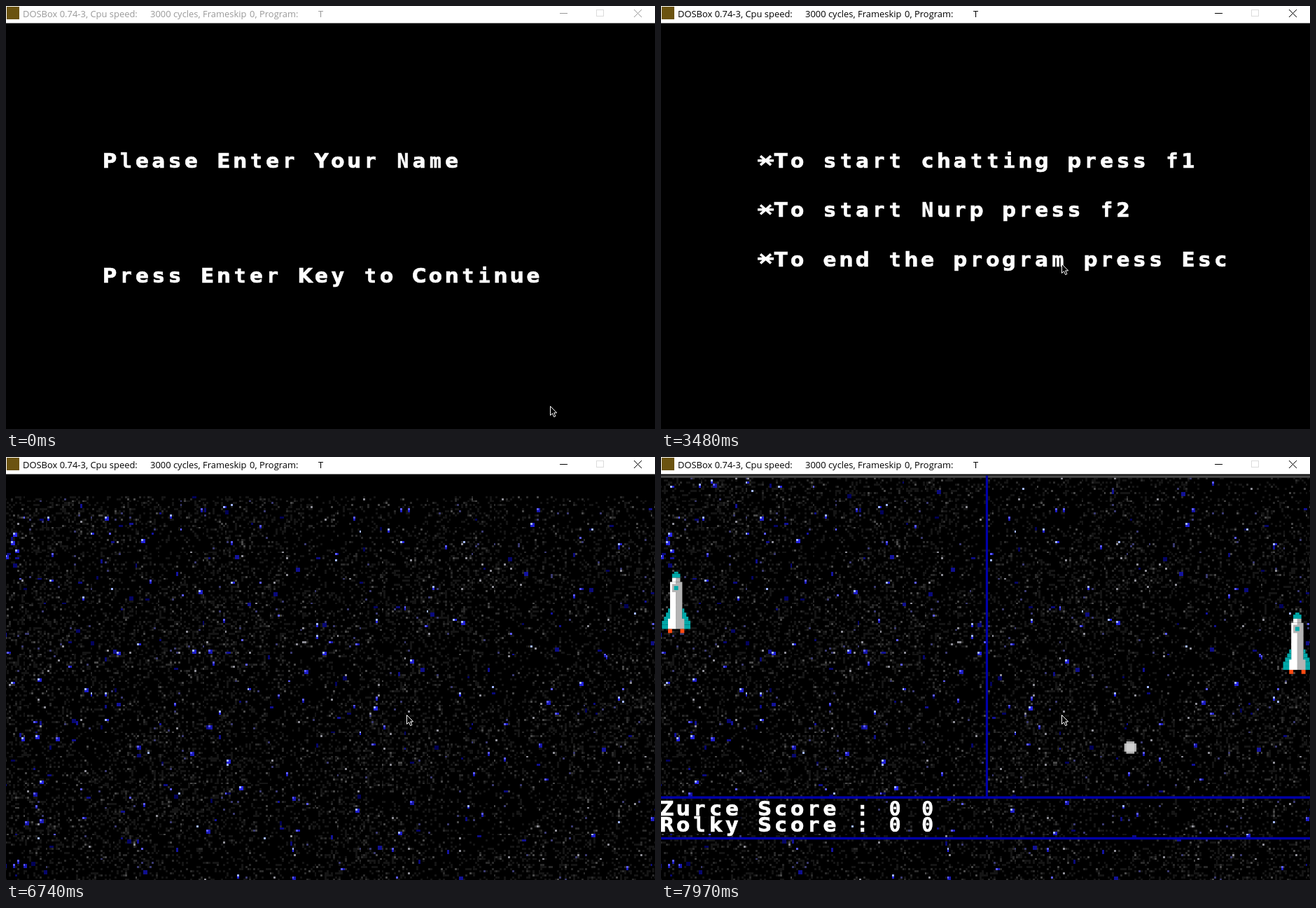
An HTML page with a canvas that plays this animation: 927x604 px, repeating every 8 s.

```html
<!DOCTYPE html>
<html lang="en">
<head>
<meta charset="utf-8">
<title>Terminal game</title>
<style>
  html, body { margin: 0; width: 100%; height: 100%; overflow: hidden; background: #000; }
  canvas { display: block; width: 100%; height: 100%; }
</style>
</head>
<body>
<canvas id="stage" width="927" height="604"></canvas>
<script>
const LOOP = 8000;
const FOCUS = 380, MENU = 3480, LEVELS = 5500, GAME = 6590;
const FRAME = 76.7;
const ctx = document.getElementById('stage').getContext('2d');

// The 320 x 200 screen inside the window
const view = { x: -1.6, y: 23.6, sx: 2.909, sy: 2.92 };
const CELL_W = 8 * view.sx, CELL_H = 8 * view.sy;
const WIDE = 'bold 28px "DejaVu Sans", sans-serif';
const MONO = 'bold 28px "DejaVu Sans Mono", monospace';

// When each player's line opens and its letters are typed
const players = [
  { name: 'Zurce', opens: 0, keys: [680, 930, 1000, 1230, 1460] },
  { name: 'Rolky', opens: 1690, keys: [2090, 2240, 2550, 2870, 3330] }
];

function seeded(seed) {
  return () => (seed = (Math.imul(seed, 1664525) + 1013904223) >>> 0) / 4294967296;
}

function makeSky() {
  const canvas = document.createElement('canvas');
  canvas.width = 320;
  canvas.height = 200;
  const g = canvas.getContext('2d');
  const random = seeded(74);
  const dot = (color, x, y, w = 1, h = 1) => {
    g.fillStyle = color;
    g.fillRect(x, y, w, h);
  };
  dot('#000', 0, 0, 320, 200);
  for (let y = 2; y < 200; y++) {
    for (let x = 0; x < 320; x++) {
      const patchiness = Math.sin(x / 27 + y / 19) * Math.cos(y / 31 - x / 43);
      const level = random() / (1 + 0.35 * patchiness - x / 1600);
      if (level < 0.002) dot('#8c8c94', x, y);
      else if (level < 0.006) dot('#39396e', x, y);
      else if (level < 0.016) dot('#484848', x, y);
      else if (level < 0.055) dot('#2a2a2a', x, y);
      else if (level < 0.24) dot('#151515', x, y);
    }
  }
  // Blue stars, denser on the left, some with a pale core
  for (let i = 0; i < 330; i++) {
    const x = Math.floor(320 * random() ** 1.25), y = 3 + Math.floor(196 * random());
    const glow = random();
    const w = random() < 0.5 ? 2 : 1, h = random() < 0.5 ? 2 : 1;
    dot(`rgb(${40 * glow},${40 * glow},${80 + 160 * glow})`, x, y, w, h);
    if (glow > 0.5) dot(glow > 0.75 ? '#a0b4ff' : '#5a5aff', x, y);
  }
  return canvas;
}
const sky = makeSky();

function block(color, x, y, w, h) {
  ctx.fillStyle = color;
  ctx.fillRect(x, y, w, h);
}

function asterisk(x, y) {
  const mid = y + 10.2;
  ctx.lineWidth = 3.6;
  ctx.beginPath();
  ctx.moveTo(x, mid);
  ctx.lineTo(x + 23, mid);
  for (const rise of [-6.5, 6.5]) {
    ctx.moveTo(x + 4, mid - rise);
    ctx.lineTo(x + 19, mid + rise);
  }
  ctx.stroke();
}

// Wide face where a letter suits the cell; the monospaced one otherwise
function chooseFont(char) {
  ctx.font = WIDE;
  const width = ctx.measureText(char).width;
  if (char === '0' || width < 15 || width > 22) ctx.font = MONO;
}

function print(text, col, row, opaque) {
  ctx.textAlign = 'center';
  ctx.lineJoin = 'miter';
  ctx.miterLimit = 2;
  [...text].forEach((char, i) => {
    if (char === ' ') return;
    const x = view.x + (col + i) * CELL_W, y = view.y + row * CELL_H;
    if (opaque) block('#000', x, y, CELL_W, CELL_H);
    ctx.fillStyle = ctx.strokeStyle = '#fff';
    if (char === '*') return asterisk(x, y);
    chooseFont(char);
    ctx.lineWidth = 0.6;
    ctx.fillText(char, x + 10, y + 20.9);
    ctx.strokeText(char, x + 10, y + 20.9);
  });
}

function drawShip(x, y, flame) {
  const cyan = '#00a8a8', white = '#fff', grey = '#b4b4b4';
  ctx.save();
  ctx.translate(x, y);
  block(cyan, 7, 0, 2, 1);
  block(cyan, 6, 1, 4, 2);
  block(white, 6, 3, 2, 2);
  block(grey, 8, 3, 2, 2);
  block(white, 5, 5, 3, 23);
  block(grey, 8, 5, 3, 23);
  block(grey, 6, 6, 4, 4);
  block(cyan, 7, 7, 2, 2);
  for (let i = 0; i < 5; i++) {
    const spread = Math.min(i, 3);
    block(cyan, 4 - spread, 18 + i * 2, 1 + spread, 2);
    block(cyan, 11, 18 + i * 2, 1 + spread, 2);
  }
  block(white, 4, 23, 2, 5);
  block(grey, 10, 23, 2, 5);
  for (const side of [4, 10]) block(flame, side, 28, 2, 2);
  ctx.restore();
}

function drawBall(x, y) {
  block('#b4b4b4', x + 1, y, 4, 6);
  block('#b4b4b4', x, y + 1, 6, 4);
  block('#cecece', x + 1, y + 1, 4, 4);
}

function drawCourt() {
  const blue = '#0000a8';
  block('#484848', 0, 0.9, 320, 1.2);
  block(blue, 160, 1, 1.1, 157);
  block(blue, 0, 157.8, 320, 1.2);
  block(blue, 0, 177.8, 320, 1.2);
}

function drawGame(t) {
  const frame = Math.floor((t - GAME + 5) / FRAME);
  const playing = frame >= 4;
  // The sky is painted from the bottom up
  const top = Math.max(2, Math.round(140 - 64.5 * frame));
  ctx.save();
  ctx.translate(view.x, view.y);
  ctx.scale(view.sx, view.sy);
  ctx.imageSmoothingEnabled = false;
  ctx.drawImage(sky, 0, top, 320, 200 - top, 0, top, 320, 200 - top);
  if (playing) {
    const flame = frame < 17 ? '#c23c14' : '#ff4a12';
    const moves = (frame >= 10) + (frame >= 13);
    const travel = 4 * Math.round((frame - 8) * 1.1);
    drawCourt();
    drawShip(0, 48, flame);
    drawShip(305, 48 + 10 * moves, flame);
    drawBall(184 + travel, 87 + travel);
  }
  ctx.restore();
  if (playing) players.forEach((p, i) => print(p.name + ' Score : 0 0', 0, 20 + i, true));
}

function drawScreen(t) {
  if (t < MENU) {
    const player = players.filter(p => p.opens <= t).pop();
    const typed = player.keys.filter(key => key <= t).length;
    print('Please Enter Your Name', 6, 8);
    print(player.name.slice(0, typed), 6, 11);
    print('Press Enter Key to Continue', 6, 15);
  } else if (t < LEVELS) {
    print('*To start chatting press f1', 6, 8);
    print('*To start Nurp press f2', 6, 11);
    print('*To end the program press Esc', 6, 14);
  } else if (t < GAME) {
    print('*To choose level 1 press f1', 6, 8);
    print('*To chosse level 2 press f2', 6, 11);
  } else {
    drawGame(t);
  }
}

function drawTitleBar(focused) {
  const ink = focused ? '#000' : '#999';
  block('#fff', 0, 0, 927, 24.5);
  block('#6b5310', 1, 1, 18, 18);
  ctx.fillStyle = ink;
  ctx.font = '12.95px "Open Sans", "Noto Sans", sans-serif';
  ctx.textAlign = 'left';
  const label = (text, x) => ctx.fillText(text, x, 15.5);
  label('DOSBox 0.74-3, Cpu speed:', 24);
  label('3000 cycles, Frameskip', 206);
  label('0,', 348);
  label('Program:', 362);
  label('T', 446);
  ctx.lineWidth = 1;
  ctx.strokeStyle = '#dcdcdc';
  ctx.strokeRect(843.5, 5.5, 10, 9);
  ctx.strokeStyle = ink;
  ctx.stroke(new Path2D('M791 10.5H802M897 5L908 16M908 5L897 16'));
}

function drawPointer(t) {
  const frames = Math.floor((t + 10) / FRAME);
  const p = Math.min(frames / 4, 1);
  const eased = p * p * (3 - 2 * p);
  const arrow = new Path2D('M0 0V13L3 10.2L5.2 15.2L7.4 14.2L5.2 9.4H9.2Z');
  ctx.save();
  ctx.translate(777.5 - Math.round(205 * eased), 571.5 - Math.round(203 * eased));
  ctx.fillStyle = '#000';
  ctx.strokeStyle = '#fff';
  ctx.lineWidth = 1;
  ctx.fill(arrow);
  ctx.stroke(arrow);
  ctx.restore();
}

function draw(t) {
  block('#000', 0, 0, 927, 604);
  drawScreen(t);
  drawTitleBar(t >= FOCUS);
  drawPointer(t);
}

const start = performance.now();
function tick() {
  draw((performance.now() - start) % LOOP);
  requestAnimationFrame(tick);
}
tick();
</script>
</body>
</html>
```
